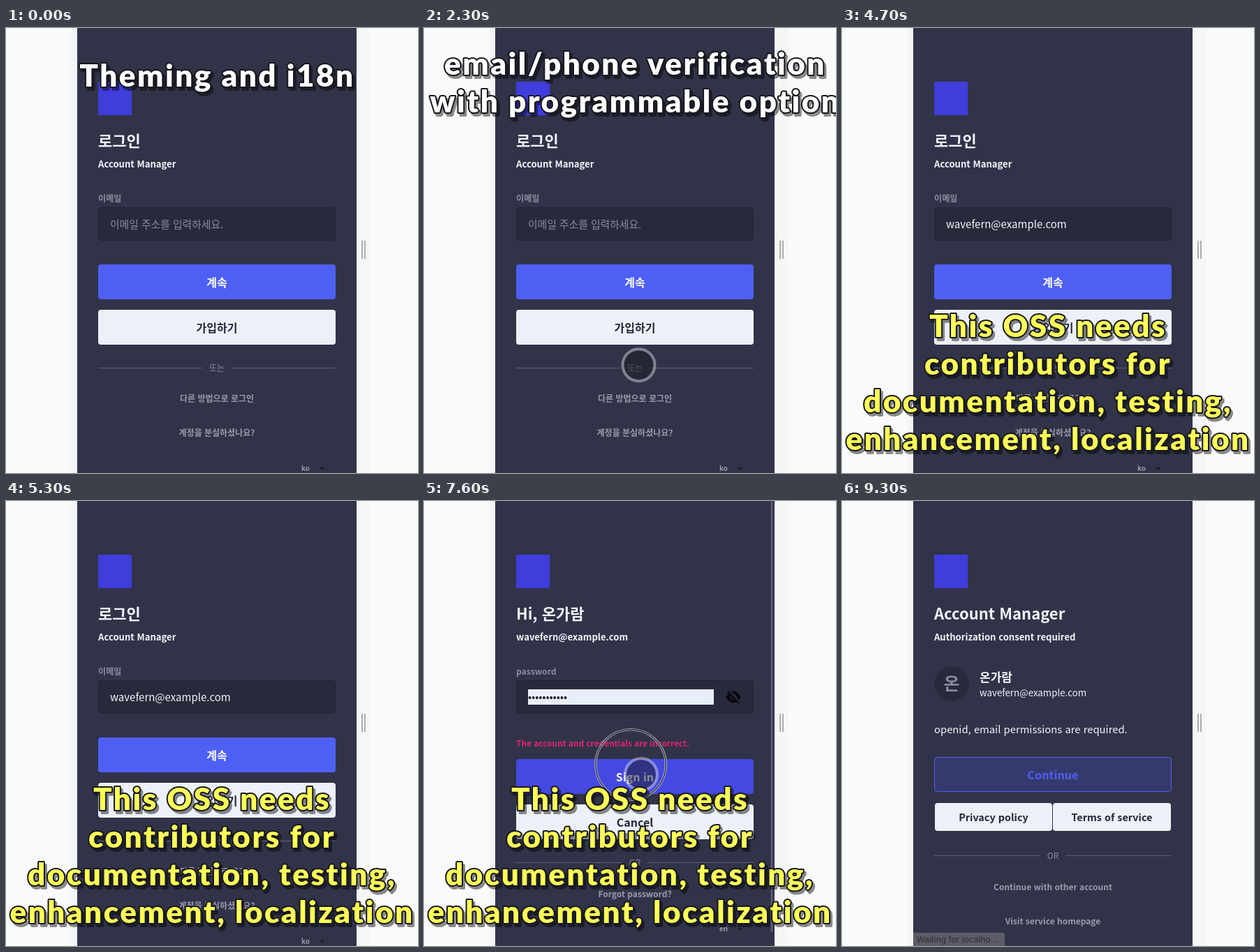
Animation of 590x638 px, one loop 9.4 s. Source, as an HTML page:

```html
<!DOCTYPE html>
<html lang="ko">
<head>
<meta charset="utf-8">
<title>Account manager demo</title>
<style>
  html, body { margin: 0; width: 100%; height: 100%; overflow: hidden; background: #f9fafa; }
  svg { display: block; width: 590px; height: 638px; }
  text { font-family: "Noto Sans CJK KR", "Noto Sans KR", "Noto Sans CJK JP", "Noto Sans CJK", sans-serif; }
  .caption text {
    font: 900 44px Lato, sans-serif; letter-spacing: 2.5px; text-anchor: middle;
    stroke: #17181f; stroke-width: 4px; stroke-linejoin: round; paint-order: stroke;
  }
  .caption { filter: drop-shadow(3px 4px .5px rgba(0, 0, 0, .45)); }
  .status { font: 12px Inter, Roboto, sans-serif; }
</style>
</head>
<body>
<svg viewBox="0 0 590 638">
  <defs>
    <linearGradient id="edge">
      <stop offset="0" stop-color="#000" stop-opacity="0"/>
      <stop offset="1" stop-color="#000" stop-opacity=".04"/>
    </linearGradient>
    <clipPath id="panel"><rect x="102" width="400" height="638"/></clipPath>
  </defs>
  <rect width="590" height="638" fill="#f9fafa"/>
  <rect x="90" width="12" height="638" fill="url(#edge)"/>
  <rect x="502" width="19" height="638" fill="#f5f6f6"/>
  <path d="M510 305v26M514 305v26" stroke="#999a9c" stroke-width="1.6"/>
  <rect x="102" width="400" height="638" fill="#313349"/>
  <g clip-path="url(#panel)"><g id="page"></g></g>
  <g id="touch">
    <circle r="21" fill="#1c1c24" fill-opacity=".5"/>
    <circle r="23" fill="none" stroke="#d2d2d6" stroke-opacity=".5" stroke-width="4"/>
  </g>
  <g id="ripple" fill="none">
    <circle r="1" stroke="#c9cad6" stroke-width="3.2" vector-effect="non-scaling-stroke"/>
    <circle r="1" stroke="#20212c" stroke-width="1.4" vector-effect="non-scaling-stroke"/>
  </g>
  <g id="captions"></g>
</svg>
<script>
const LOOP = 9400, FADE = 300;
const MAIL = 'wavefern@example.com', NAME = '온가람';
const C = {
  text: '#f3f4f9', dim: '#9a9bab', hint: '#8b8c9f', ink: '#25263a',
  blue: '#4e60f4', deep: '#4449e2', pale: '#ecf0f9', pressed: '#e1e5f1', pink: '#e0266f'
};
const $ = id => document.getElementById(id);

// Drawing helpers
const text = (s, x, y, size, fill = C.text, weight = 400, anchor = 'start') =>
  `<text x="${x}" y="${y}" font-size="${size}" fill="${fill}" font-weight="${weight}" text-anchor="${anchor}">${s}</text>`;
const box = (x, y, w, h, fill, stroke = 'none') =>
  `<rect x="${x}" y="${y}" width="${w}" height="${h}" rx="4" fill="${fill}" stroke="${stroke}"/>`;
const button = (s, y, fill, color) =>
  box(132, y, 340, 50, fill) + text(s, 302, y + 32, 16, color, 700, 'middle');
const primary = (s, y, fill = C.blue) => button(s, y, fill, '#fff');
const plain = (s, y, down) => button(s, y, down ? C.pressed : C.pale, C.ink);
const link = (s, y) => text(s, 302, y, 12, C.dim, 700, 'middle');
const label = (s, y) => text(s, 132, y, 12.1, C.hint, 700);
const body = (s, y) => text(s, 132, y, 14.8);
const field = y => box(132.5, y + .5, 339, 47, '#282a3c', '#22232f');
const error = (s, y) => text(s, 132, y, 11.85, C.pink, 700);
const divider = (s, y, gap) =>
  `<path d="M132 ${y}H${302 - gap}M${302 + gap} ${y}H472" stroke="#5f6175"/>` +
  text(s, 302, y + 4, 12, C.hint, 400, 'middle');
const lang = (s, y) => text(s, 423, y, 10, C.dim, 700) +
  `<path d="M450.5 ${y - 5}l2.5 2.5 2.5-2.5" fill="none" stroke="#12131b" stroke-width="1.4"/>`;
const head = (title, sub) =>
  `<rect x="132" y="77" width="48" height="48" fill="#3f3ddb"/>` +
  text(title, 132, 170, 22, C.text, 700) + text(sub, 132, 200, 13.1, C.text, 700);

// Pages
const login = mail => head('로그인', 'Account Manager') + label('이메일', 249) + field(257) +
  (mail ? text(mail, 149, 287, 15) : text('이메일 주소를 입력하세요.', 149, 287, 14.8, C.hint)) +
  primary('계속', 339) + plain('가입하기', 404) + divider('또는', 487.5, 21) +
  link('다른 방법으로 로그인', 536) + link('계정을 분실하셨나요?', 585) + lang('ko', 635);

const findAccount = down => head('계정 찾기', '핸드폰 인증 필요') +
  body('계정에 핸드폰 번호가 등록되어 있나요?', 252) + label('핸드폰 번호', 299) + field(307) +
  text('핸드폰 번호를 입력하세요. (KR)', 149, 337, 14.8, C.hint) +
  primary('계속', 389) + plain('취소', 454, down) + lang('ko', 541);

const logout = down => head('로그아웃', '로그아웃 완료') +
  body('계정 세션이 존재하지 않습니다.', 252) + error('창을 직접 닫아주세요.', 299) +
  plain('닫기', 318, down) + lang('ko', 405);

const eyeOff = `<path d="M432 281q11-17 22 0q-11 17-22 0z" fill="#08080c"/>
  <circle cx="443" cy="281" r="4.6" fill="#282a3c"/><circle cx="443" cy="281" r="2.8" fill="#08080c"/>
  <path d="M436 272l16 17" stroke="#282a3c" stroke-width="4"/><path d="M435 273l16 17" stroke="#08080c" stroke-width="2"/>`;

const password = (failed, down) => {
  const y = failed ? 370 : 339;
  return head('Hi, ' + NAME, MAIL) + label('password', 249) + field(257) +
    `<rect x="149" y="270" width="266" height="22" fill="#e9eefb"/>` +
    Array.from({ length: 11 }, (_, i) => `<circle cx="${151.5 + i * 5.1}" cy="282" r="1.9" fill="#111"/>`).join('') +
    eyeOff + (failed ? error('The account and credentials are incorrect.', 352) : '') +
    primary('Sign in', y, down ? C.deep : C.blue) + plain('Cancel', y + 65) +
    divider('OR', y + 148.5, 18) + link('Forgot password?', y + 198) + lang('en', y + 247) +
    `<rect x="496.5" y="0" width="3" height="${y + 248}" rx="1.5" fill="#595b6f"/>`;
};

const consent = (down, waiting) => head('Account Manager', 'Authorization consent required') +
  `<circle cx="157" cy="262" r="25" fill="#282a3c"/>` + text(NAME[0], 157, 271, 25, C.hint, 700, 'middle') +
  text(NAME, 197, 259, 17, C.text, 700) + text(MAIL, 197, 280, 13.3) +
  body('openid, email permissions are required.', 333) +
  (down ? box(132.5, 367.5, 339, 49, '#343a6d', '#5062f4') + text('Continue', 302, 399, 16.3, '#4f60f2', 700, 'middle')
        : primary('Continue', 367)) +
  box(133, 433, 168, 40, C.pale) + box(302, 433, 169, 40, C.pale) +
  text('Privacy policy', 217, 459, 14.4, C.ink, 700, 'middle') +
  text('Terms of service', 386.5, 459, 14.4, C.ink, 700, 'middle') +
  divider('OR', 508.5, 18) + link('Continue with other account', 558) + link('Visit service homepage', 607) +
  (waiting ? `<path d="M102 638v-19h128q3 0 3 3v16z" fill="#5c5c69"/>
    <text class="status" x="107" y="633" fill="#2e2e38">Waiting for localho...</text>` : '');

function pageAt(t) {
  if (t < 1000) return login('');
  if (t < 2200) return findAccount(t >= 2000);
  if (t < 5500) return login(MAIL.slice(0, Math.max(0, Math.floor((t - 2400) / 25))));
  if (t < 6500) return logout(t >= 6000);
  if (t < 8300) return password(t >= 7200, t >= 7500);
  return consent(t >= 8900, t >= 9000);
}

// Steps of [time, ...values], eased between neighbours
function tween(steps, t) {
  const i = steps.findIndex(s => s[0] > t);
  if (i === 0) return steps[0].slice(1);
  if (i < 0) return steps[steps.length - 1].slice(1);
  const a = steps[i - 1], b = steps[i], k = (t - a[0]) / (b[0] - a[0]), e = k * k * (3 - 2 * k);
  return a.slice(1).map((v, j) => v + (b[j + 1] - v) * e);
}
const touchSteps = [
  [300, 335, 530, 0], [500, 330, 550, 1], [800, 311, 573, 1], [1300, 311, 573, 1],
  [1900, 305, 484, 1], [2200, 305, 484, 1], [2900, 349, 470, 1], [3200, 349, 435, 1],
  [3400, 349, 435, 1], [3800, 349, 470, 1], [4000, 349, 470, 0],
  [5600, 294, 410, 0], [5900, 294, 351, 1], [6400, 294, 351, 1], [6600, 294, 351, 0],
  [6900, 310, 330, 0], [7100, 300, 350, 1], [7450, 296, 378, 1], [7600, 311, 392, 1],
  [8600, 300, 395, 1], [9000, 300, 395, 1], [9200, 300, 395, 0]
];
const scrollSteps = [[2900, 0], [3200, -35], [3400, -35], [3800, 0]];

const captions = [
  { from: -FADE, to: 1700, x: 302.5, y: 84, fill: '#fff', lines: ['Theming and i18n'] },
  { from: 1700, to: 3900, x: 302.5, y: 67, fill: '#fff',
    lines: ['email/phone verification', 'with programmable option'] },
  { from: 4100, to: 8600, x: 295, y: 443, fill: '#fdfd58',
    lines: ['This OSS needs', 'contributors for', 'documentation, testing,', 'enhancement, localization'] }
];
$('captions').innerHTML = captions.map(c => `<g class="caption" fill="${c.fill}">` +
  c.lines.map((s, i) => `<text x="${c.x}" y="${c.y + i * 54}">${s}</text>`).join('') + '</g>').join('');
const captionNodes = [...$('captions').children];
const clamp = v => Math.min(1, Math.max(0, v));

let shown = '';
function draw(t) {
  const page = pageAt(t);
  if (page !== shown) $('page').innerHTML = shown = page;
  $('page').setAttribute('transform', `translate(0 ${tween(scrollSteps, t)[0]})`);

  const [x, y, alpha] = tween(touchSteps, t);
  $('touch').setAttribute('transform', `translate(${x} ${y})`);
  $('touch').setAttribute('opacity', alpha);

  const r = 25 + (t - 7500) / 4;
  const rippling = t >= 7500 && t < 7700;
  $('ripple').setAttribute('visibility', rippling ? 'visible' : 'hidden');
  if (rippling) $('ripple').setAttribute('transform', `translate(296 378) scale(${r})`);

  captions.forEach((c, i) => {
    const a = Math.min(clamp((t - c.from) / FADE), clamp((c.to - t) / FADE));
    captionNodes[i].style.opacity = a;
  });
}

const start = performance.now();
function tick() {
  draw((performance.now() - start) % LOOP);
  requestAnimationFrame(tick);
}
tick();
</script>
</body>
</html>
```
